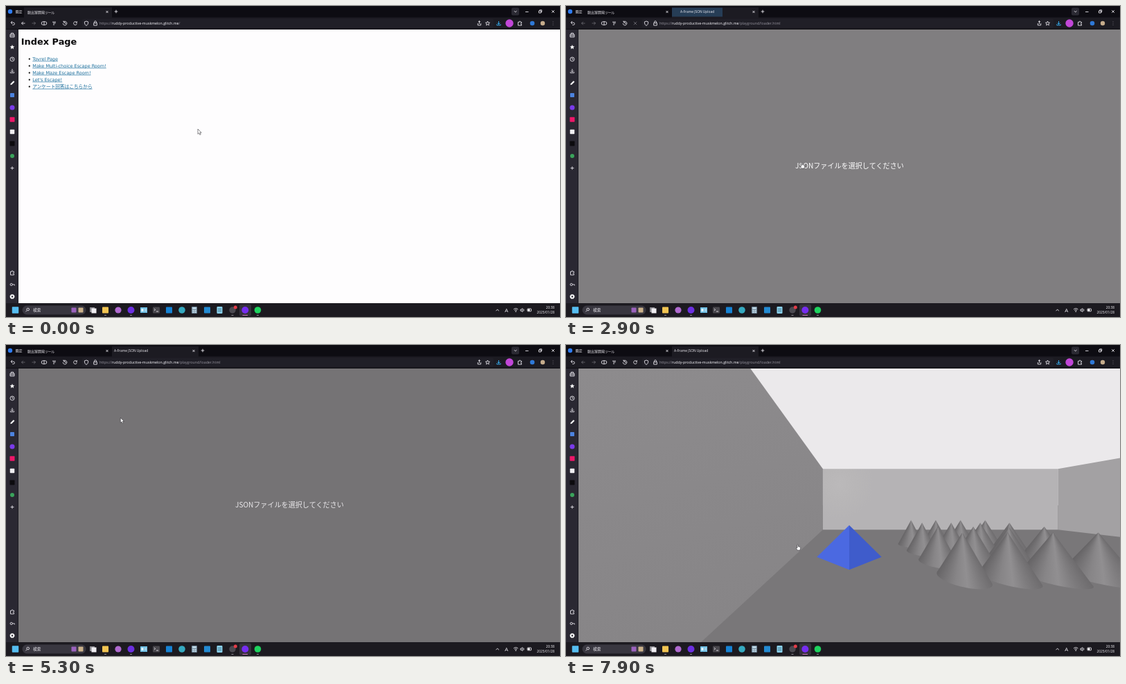
Write an HTML page with a canvas that moves like this. It is 800 by 450 pixels and loops after 8 s.

```html
<!DOCTYPE html>
<html lang="ja">
<head>
<meta charset="utf-8">
<style>
html, body { margin: 0; width: 100%; height: 100%; overflow: hidden; background: #1c1b22; }
canvas, svg { position: absolute; left: 0; top: 0; }
text { font-family: 'Open Sans', 'Noto Sans CJK JP', sans-serif; white-space: pre; }
.jp { font-family: 'Noto Sans CJK JP', sans-serif; font-feature-settings: 'palt'; }
.page { font-family: 'DejaVu Sans', 'Noto Sans CJK JP', sans-serif; }
.ln { fill: none; stroke: #e6e4ea; stroke-width: .9; }
</style>
</head>
<body>
<canvas id="scene" width="800" height="450"></canvas>
<svg id="stage" width="800" height="450" viewBox="0 0 800 450"></svg>
<script>
const LOOP = 8000, STEP = 100;
const OPEN_TAB = 700, LOADED = 2800, DIALOG_IN = 3500, DIALOG_OUT = 5100, SCENE = 5600;

const rect = (x, y, w, h, fill, extra = '') => `<rect x="${x}" y="${y}" width="${w}" height="${h}" fill="${fill}" ${extra}/>`;
const dot = (x, y, r, fill, extra = '') => `<circle cx="${x}" cy="${y}" r="${r}" fill="${fill}" ${extra}/>`;
const box = (x, y, s, fill) => rect(x - s / 2, y - s / 2, s, s, fill, 'rx=".8"');
const line = (d, extra = '') => `<path class="ln" d="${d}" ${extra}/>`;
const text = (x, y, s, size, fill = '#eeecf2', extra = '') =>
  `<text x="${x}" y="${y + size * .36}" font-size="${size}" fill="${fill}" ${extra}>${s}</text>`;
const jp = (x, y, s, size, fill, extra = '') => text(x, y, s, size, fill, 'class="jp" ' + extra);
const group = (id, body, extra = '') => `<g id="${id}" ${extra}>${body}</g>`;
const cross = (x, y, r, extra) => line(`M${x - r} ${y - r}l${2 * r} ${2 * r}m0 ${-2 * r}l${-2 * r} ${2 * r}`, extra);
const plus = (x, y, r) => line(`M${x - r} ${y}h${2 * r}M${x} ${y - r}v${2 * r}`);
const arrow = (x, y, dir, extra) => line(`M${x + 2.5 * dir} ${y}h${-5 * dir}m${2.3 * dir} -2.3l${-2.3 * dir} 2.3l${2.3 * dir} 2.3`, extra);
const chevron = (x, y, r, extra) => line(`M${x - r} ${y - r / 2}l${r} ${r}l${r} ${-r}`, extra);
const reload = (x, y) => line(`M${x + 2} ${y - 1.3}a2.4 2.4 0 1 0 .4 1.7M${x + 2.4} ${y - 2.7}v1.8h-1.8`);
const down = (x, y, c) => line(`M${x} ${y - 3}v4.4m-1.9 -1.8l1.9 1.9l1.9 -1.9M${x - 2.7} ${y + 1.4}v1.4h5.4v-1.4`, `style="stroke:${c}"`);
const star = (x, y, r, extra) => {
  const pts = [...Array(10)].map((_, i) => {
    const a = i * Math.PI / 5, k = i % 2 ? r * .45 : r;
    return (x + k * Math.sin(a)).toFixed(2) + ',' + (y - k * Math.cos(a)).toFixed(2);
  });
  return `<polygon points="${pts.join(' ')}" ${extra}/>`;
};
const puzzle = (x, y) => line(`M${x - 2.5} ${y - 1.7}h1.8c-.5 -1.7 2 -1.7 1.5 0h1.7v1.7c-1.6 -.4 -1.6 2 0 1.6v1.5h-5z`);
const lens = (x, y) => line(`M${x + 2.5} ${y - 1}a1.8 1.8 0 1 0 -3.6 0a1.8 1.8 0 1 0 3.6 0M${x - .6} ${y + .4}l-2 2`);

function titleBar() {
  return rect(0, 0, 800, 17, '#0d0c12') + rect(0, 16.5, 800, 17.5, '#1c1b22')
    + rect(0, 33.3, 800, .7, '#09090c')
    + dot(6, 8, 3.2, '#2f7cf0') + jp(13.5, 8, '既定', 5)
    + rect(26, 2, 127, 15, '#1c1b22', 'id="tab1"')
    + jp(31, 8.7, '脱出室開発ツール', 5) + cross(146, 8.5, 1.5)
    + group('plus1', plus(159, 8, 2.3))
    + group('tab2', rect(153, 2, 125, 15, '#1c1b22') + rect(153, 2.5, 0, 13, '#263d56', 'id="burst"')
      + dot(157, 9, .8, '#9f9da8', 'id="loader"')
      + text(165, 8.7, 'A-Frame JSON Upload', 4.85, '#f3f1f7', 'id="tabName"')
      + cross(271, 8.5, 1.5) + plus(284, 8, 2.3))
    + rect(730, 2.5, 11, 11, '#2b2a33', 'rx="2"') + chevron(735.7, 8, 1.8)
    + line('M750 8.5h4.5') + line('M769.5 7h3v3h-3zM770.7 7v-1.2h3v3h-1.2') + cross(790, 8, 1.8);
}

function toolBar() {
  const dim = 'opacity=".35"';
  return line('M7.5 24h3.2a1.7 1.7 0 0 1 0 3.4h-1.5M9 22l-2 2l2 2')
    + group('back', arrow(25, 25, 1)) + arrow(40, 25, -1, dim)
    + line('M53.5 22.7h3a2.3 2.3 0 0 1 0 4.6h-3a2.3 2.3 0 0 1 0 -4.6M55 22v6')
    + line('M67 23.2h5M68 25h3.5M68 27h2')
    + line('M82.3 25a2.8 2.8 0 1 0 .9 -2M83 21.5v1.9h1.9M85.2 23.3v2h1.5')
    + group('reload', reload(100, 25)) + group('stop', cross(100, 25, 2.2))
    + rect(110, 18.5, 594, 13, '#201f27', 'rx="2"')
    + line('M116 22l2.6 .9c.2 3 -.7 4.4 -2.6 5.5c-1.900 -1.100 -2.800 -2.500 -2.600 -5.500z')
    + line('M126.700 24.500h4.600v3.500h-4.600zM127.500 24.500v-1.200a1.500 1.500 0 0 1 3 0v1.200')
    + text(135, 25.2, '<tspan fill="#96949e">https://</tspan>ruddy-productive-muskmelon.glitch.me<tspan fill="#96949e" id="path">/</tspan>', 5.25, '#fbfaff')
    + line('M681.300 25v2.800h4.400v-2.800M683.500 26v-4.300m-1.600 1.500l1.600 -1.600l1.600 1.600')
    + star(695.5, 25.2, 3.2, 'class="ln"') + down(711.5, 25, '#39b9ff')
    + dot(727, 25, 5.7, '#c247d8') + puzzle(742, 25)
    + dot(760, 25, 3.3, '#2e78d7') + dot(775, 25, 3.2, '#c5ac8c')
    + [22.8, 25, 27.2].map(y => dot(790, y, .45, '#aaa8b0')).join('');
}

function sideBar() {
  return rect(0, 34, 18, 396, '#2a2832') + rect(17.4, 34, .6, 396, '#17161c')
    + line('M6 41h6v4h-6zM7.400 41v-1.800h3.200v1.800M6 43h6')
    + star(9, 59.5, 3.6, 'fill="#fff"')
    + dot(9, 77, 3, 'none', 'class="ln"') + line('M9 75v2.200h1.500')
    + down(9, 94, '#e6e4ea')
    + '<path d="M6.300 114.300l.6 -2l4 -4l1.500 1.500l-4 4z" fill="#fff"/>'
    + box(9, 129, 6, '#4c83df') + dot(9, 147, 3.5, '#7a3bea') + box(9, 164.2, 7, '#ee1769')
    + box(9, 182, 6.5, '#f0eef2') + box(9, 199, 7, '#0c0b0e') + dot(9, 217, 3, '#3aa35b')
    + plus(9, 234.5, 2.4) + puzzle(9, 386)
    + line('M9.300 403a1.600 1.600 0 1 0 -3.200 0a1.600 1.600 0 1 0 3.200 0h3v1.500')
    + dot(9, 420.5, 2.2, 'none', 'stroke="#fff" stroke-width="1.8"')
    + dot(9, 420.5, 3.1, 'none', 'stroke="#fff" stroke-dasharray="1.200 1.230"');
}

function taskBar() {
  const running = [143.5, 180.5, 327, 363.5];
  return rect(0, 430, 800, 20, '#1c1a20')
    + box(13.5, 440, 9.5, '#55bdf0')
    + rect(23.5, 433.5, 92, 13, '#393740', 'rx="6.500"') + lens(31, 440) + jp(39, 440, '検索', 5.7)
    + box(98, 440, 7, '#9b62bd') + box(108, 440, 7, '#cbb28b')
    + rect(121, 436, 7, 7, '#8b8a90') + rect(123.5, 437.5, 7, 7, '#f0eef2')
    + box(143.5, 440, 9, '#f2c452') + dot(162, 440, 4.6, '#b06ad0') + dot(180.5, 440, 5, '#6c2fe0')
    + rect(194, 436, 10, 8, '#6fc0e6') + rect(195.5, 438, 3, 4, '#e8f5fb') + line('M200 439h3M200 441h3')
    + rect(212, 435.5, 10, 9, '#49474d', 'rx="1"') + line('M214 438l1.700 1.500l-1.700 1.500M217 442h3')
    + box(235.5, 440, 9, '#1682d4') + dot(254, 440, 4.8, '#35a9c0')
    + rect(268, 435, 8, 10, '#72899b', 'rx="1"') + rect(269.3, 436.3, 5.4, 2, '#d5edfa')
    + [0, 1, 2, 3].map(i => rect(269.4 + i % 2 * 3, 439.7 + (i >> 1) * 2.4, 2.2, 1.600, '#d5edfa')).join('')
    + box(290.5, 440, 9, '#238ad2')
    + rect(304.5, 435, 8, 10, '#8bd2ec', 'rx="1"') + line('M306 438h5M306 440h5M306 442h5', 'style="stroke:#45788f"')
    + dot(327, 440, 4.7, '#4b4950') + dot(331.3, 436, 2.5, '#e33c48')
    + rect(337, 431.5, 17, 17, '#35323b', 'rx="2"') + dot(345.3, 440, 5, '#762df0') + dot(363.5, 440, 4.8, '#1ed35e')
    + running.map(x => rect(x - 1.5, 447, 3, .9, '#9a98a0')).join('') + rect(341.5, 447, 7.5, 1, '#d076c0')
    + line('M707.500 441.200l2.200 -2.200l2.200 2.200') + text(720.3, 440, 'A', 7.8)
    + line('M733 439a4.500 4.500 0 0 1 6.400 0M734.400 440.500a2.500 2.500 0 0 1 3.600 0') + dot(736.2, 442, .8, '#fff')
    + line('M743 439h1.300l1.500 -1.400v5l-1.500 -1.400h-1.300zM747.300 438.400q1.300 1.600 0 3.200')
    + rect(753, 438, 5.500, 3.800, 'none', 'class="ln" rx=".7"') + rect(753.5, 438.5, 3, 2.800, '#fff')
    + text(792, 436.7, '20:38', 4.8, '#f2f0f5', 'text-anchor="end"')
    + text(792, 443.2, '2025/01/28', 4.8, '#f2f0f5', 'text-anchor="end"');
}

function indexPage() {
  const links = ['Tovrel Page', 'Make Multi-choice Escape Room!', 'Make Maze Escape Room!', 'Let\'s Escape!', 'アンケート回答はこちらから'];
  return rect(18, 34, 782, 396, '#fefdfe')
    + text(21.8, 51.8, 'Index Page', 12.9, '#0b0a0c', 'class="page" font-weight="bold"')
    + links.map((s, i) => dot(33.8, 76.7 + i * 10, 1.15, '#111')
      + text(38.3, 76.3 + i * 10, s, i < 4 ? 6.47 : 6.67, '#1c6f9c', 'class="page" text-decoration="underline"')).join('');
}

const heads = [['今日', 67], ['昨日', 89], ['先週', 120], ['かなり前', 142]];
const files = [
  ['maze_registry_2025-01-28_11-30-03.json', '2025/01/28 20:30', 78],
  ['multiChoice_registry_2025-01-27_08-54-37.json', '2025/01/27 17:54', 100],
  ['multiChoice_registry_2025-01-27_08-32-14.json', '2025/01/27 17:32', 109],
  ['maze_registry_2025-01-21_11-38-06.json', '2025/01/21 20:38', 131],
  ['multiChoice_registry_2024-10-09_05-53-26.json', '2024/10/09 14:53', 153]];

function dialog() {
  const places = [['ホーム', 55.5, 23, '#e58b4d'], ['ギャラリー', 65.5, 23, '#3d9fe0'], ['デスクトップ', 85.5, 23, '#2fa7d6'],
    ['ダウンロード', 95.5, 23, '#2bb58a'], ['ドキュメント', 105, 23, '#9ab0c2'], ['Git', 115, 23, '#c8c6ca'], ['PC', 135, 23, '#3cabd9']];
  const grey = 'style="stroke:#8a888e;stroke-width:.6"';
  const button = (x, w, s, c) => rect(x, 204.500, w, 9, '#333135', `rx="1.500" stroke="${c}" stroke-width=".8"`)
    + jp(x + w / 2, 209, s, 4.800, '#fff', 'text-anchor="middle"');
  return rect(2, -2, 395, 224, '#1b191e', 'rx="2" style="filter:drop-shadow(0 8px 12px #000b)"')
    + '<g clip-path="url(#dlg)">'
    + rect(2, 0, 395, 13, '#1f1d22') + dot(10, 6.5, 3.8, '#762df0') + jp(16, 6.5, 'ファイルのアップロード', 4.800) + cross(390.500, 6.5, 1.800)
    + arrow(12.500, 24, 1) + arrow(32, 24, -1, 'opacity=".5"') + chevron(42, 24, 1.300, grey)
    + line('M51.500 27v-5.500m-2.200 2.200l2.200 -2.200l2.200 2.200')
    + rect(61, 16.500, 242, 15, 'none', 'stroke="#39373c" stroke-width=".8"') + down(68, 24, '#27c08b')
    + line('M74 22.800l1.200 1.200l-1.200 1.200') + jp(79, 24, 'ダウンロード', 4.900) + chevron(279, 24, 1.400) + reload(294.500, 24)
    + rect(307.500, 16.500, 83, 15, 'none', 'stroke="#39373c" stroke-width=".8"')
    + jp(311, 24, 'ダウンロードの検索', 4.700, '#8d8b91') + lens(386, 24)
    + rect(2, 34, 395, .6, '#2d2b30')
    + jp(10.500, 42, '整理', 5) + '<path d="M23 41.200h3.600l-1.800 2z" fill="#ddd"/>' + jp(39, 42, '新しいフォルダー', 4.800)
    + rect(346, 39, 6, 6, '#a5a3a9') + line('M346 42h6M349 39v6', 'style="stroke:#333;stroke-width:.5"')
    + '<path d="M356.500 41.200h3.600l-1.800 2z" fill="#ddd"/>'
    + rect(369, 39, 6.500, 6.500, '#e8e6ec') + rect(372.5, 39, 3, 6.500, '#3a9fd8') + dot(387, 42, 3.400, '#1d80c8')
    + text(386, 42, '?', 4.500)
    + rect(2, 48, 395, 140, '#19171b') + rect(5, 50.5, 63, 10, '#323035', 'rx="1"') + rect(69.500, 48, .5, 140, '#2d2b30')
    + places.map(([s, y, x, c], i) => box(17.300, y, 5.500, c) + jp(x, y, s, 4.800, '#eceaf0')
      + (i > 1 && i < 6 ? line(`M62.800 ${y + 2}l2 -2m-1.500 -1.500l3 3l1 -3.500z`, grey) : '')).join('')
    + line('M8 75.500h57M8 125h57', 'style="stroke:#333136;stroke-width:.6"')
    + line('M13 54.800l1.300 1.200l-1.300 1.200M8 134l1.200 1.200l-1.200 1.200', grey)
    + rect(70, 0, 327, 9, '#4a484c', 'id="hover"')
    + jp(77, 54, '名前', 4.900) + jp(302, 54, '更新日時', 4.900) + jp(362.500, 54, '種類', 4.900)
    + rect(299.500, 49, .6, 10, '#4a484d') + rect(359.500, 49, .6, 10, '#4a484d') + chevron(329, 50, 1, grey)
    + heads.map(([s, y]) => chevron(74.500, y, 1.800, grey) + jp(79, y, s, 5.600)).join('')
    + files.map(([s, d, y]) => rect(78.500, y - 3, 4.600, 6, '#e9e7eb') + line(`M79.500 ${y - .7}h2.600m-2.600 1.600h2.600`, grey)
      + text(86, y, s, 4.300) + text(302, y, d, 4.550) + jp(362.500, y, 'JSON ソース ファイル', 4.500)).join('')
    + rect(77, 183.800, 271, .9, '#9a989d')
    + rect(2, 188, 395, 35, '#2b292d') + jp(85, 196.500, 'ファイル名(N):', 4.800, '#fff', 'text-anchor="end"')
    + rect(87.500, 192, 218.500, 9.500, '#343236', 'stroke="#d0ced3" stroke-width=".8"') + line('M89.500 194v5.500', grey)
    + text(90, 196.700, files[0][0], 4.400, '#fff', 'id="picked"')
    + chevron(302, 196.700, 1.300) + rect(311.500, 192, 78, 9.500, '#343236', 'stroke="#77757a" stroke-width=".7"')
    + text(313.500, 196.700, '*.json', 4.800) + chevron(385.500, 196.700, 1.300)
    + button(311.500, 36, '開く(O)', '#e8e6ea') + button(353, 36, 'キャンセル', '#77757a')
    + line('M392 220.500l3 -3', grey) + '</g>';
}

const shape = d => `<path d="${d}" fill="#fff" stroke="#2a282d" stroke-width=".55" stroke-linejoin="round"/>`;
const stage = document.getElementById('stage');
stage.innerHTML = '<defs><clipPath id="dlg"><rect x="2" y="0" width="395" height="222"/></clipPath></defs>'
  + group('index', indexPage())
  + rect(18, 34, 782, 396, '#2a2832', 'id="blank"')
  + group('prompt', rect(18, 34, 782, 396, '#807e80', 'id="shade"')
    + text(331, 231, 'JSONファイルを選択してください', 10.1, '#fff', 'class="page" style="font-family:\'Noto Sans CJK JP\',sans-serif" id="ask"'))
  + group('status', rect(18, 421, 110.500, 9.500, '#2a2832', 'stroke="#55525e" stroke-width=".6"')
    + text(20, 426, 'ruddy-productive-muskmelon.glitch.me', 4.530))
  + titleBar() + toolBar() + sideBar() + taskBar()
  + group('dialog', dialog())
  + group('cursor', group('arrow', shape('M0 0v7.300l1.700 -1.500l1.200 2.600l1.300 -.6l-1.200 -2.500h2.200z'))
    + group('hand', shape('M-1 0q.7 -.9 1.300 0v2.600l2.700 .7q1 .4 .7 1.700l-.7 3h-3.700l-2.100 -3q-.2 -1.200 1.800 -.2z'))
    + group('fist', shape('M-1.800 2q.8 -1.400 1.500 -.4q.8 -.8 1.400 .1q1.100 -.4 1.300 .9v1.800l-.7 1.600h-2.700l-1.300 -2z')));

const el = {};
stage.querySelectorAll('[id]').forEach(n => el[n.id] = n);
const show = (id, on) => el[id].setAttribute('visibility', on ? 'inherit' : 'hidden');
const set = (id, attrs) => { for (const k in attrs) el[id].setAttribute(k, attrs[k]); };

// Keyed values: [time, ...values]
function at(keys, t, ease) {
  const i = keys.findIndex(k => k[0] > t);
  if (i < 1) return (i ? keys[keys.length - 1] : keys[0]).slice(1);
  const a = keys[i - 1], b = keys[i], u = ease((t - a[0]) / (b[0] - a[0]));
  return a.slice(1).map((v, j) => v + (b[j + 1] - v) * u);
}
const smooth = u => u * u * (3 - 2 * u), linear = u => u;
const mouse = [[0, 277, 178], [500, 62, 106], [700, 62, 106], [1600, 317, 213], [1900, 317, 213], [2700, 341, 227],
  [3400, 341, 227], [4400, 180, 87], [4800, 132, 78], [5100, 132, 78], [5800, 300, 215], [6100, 300, 215],
  [7100, 299, 212], [7300, 299, 212], [7900, 335, 289]];
const wallDistance = [[6100, 1.73], [6300, 2.5], [7100, 7.43], [7900, 10.73]];

const ctx = document.getElementById('scene').getContext('2d');
const FOCAL = 236, LEFT = -1.73, RIGHT = 13.7, TOP = 2.4, FLOOR = -1.6, NEAR = .1;
const project = ([x, y, z]) => { const s = FOCAL / Math.max(z, NEAR); return [409 + x * s, 232 - y * s]; };

function fill(points, style) {
  ctx.beginPath();
  points.forEach(p => ctx.lineTo(...p));
  ctx.fillStyle = style;
  ctx.fill();
}

function cone(x, z) {
  if (z < .6) return;
  const tip = project([x, -.6, z]);
  const base = [...Array(48)].map((_, i) => {
    const a = i * Math.PI / 24;
    return project([x + .5 * Math.cos(a), FLOOR, z + .5 * Math.sin(a)]);
  });
  const angle = p => Math.atan2(p[1] - tip[1], p[0] - tip[0]);
  const sorted = [...base].sort((p, q) => angle(p) - angle(q));
  const right = sorted[0], left = sorted[47], from = angle(right) - .04, span = angle(left) + .04 - from;
  const shade = ctx.createConicGradient(from, ...tip);
  ['#6b696b', '#7d7b7d', '#918f91', '#878587', '#757375', '#636163'].forEach((c, i) => shade.addColorStop(i / 5 * span / (2 * Math.PI), c));
  fill([tip, right, left], shade);
  fill(base, shade);
}

function drawScene(z) {
  const quad = (...p) => p.map(project);
  fill([[18, 34], [800, 34], [800, 232], [18, 232]], '#ebe9eb');
  fill([[18, 232], [800, 232], [800, 430], [18, 430]], '#797779');
  const side = (x, c) => fill(quad([x, TOP, z], [x, TOP, NEAR], [x, FLOOR, NEAR], [x, FLOOR, z]), c);
  const sideShade = ctx.createLinearGradient(18, 34, 120, 430);
  sideShade.addColorStop(0, '#8d8b8d');
  sideShade.addColorStop(1, '#878587');
  side(LEFT, sideShade);
  side(RIGHT, '#a3a1a3');
  const [gx, gy] = project([-.65, 1.4, z]), glow = ctx.createRadialGradient(gx, gy, 0, gx, gy, FOCAL / z * 2.3);
  const bright = Math.min(1, 2 / z);
  glow.addColorStop(0, `rgb(${183 + 22 * bright},${181 + 22 * bright},${182 + 21 * bright})`);
  glow.addColorStop(.45, `rgb(${182 + 9 * bright},${180 + 9 * bright},${182 + 8 * bright})`);
  glow.addColorStop(1, '#b5b3b5');
  fill(quad([LEFT, TOP, z], [RIGHT, TOP, z], [RIGHT, FLOOR, z], [LEFT, FLOOR, z]), glow);
  for (let row = 0; row < 4; row++)
    for (let col = 3; col >= 0; col--) cone(2.5 + col, z - 4.12 - row);
  const pz = z - 5.68;
  if (pz > .3) {
    const face = (x, c) => fill(quad([0, -.615, pz], [x, FLOOR, pz], [0, FLOOR, pz - 1]), c);
    face(-1, '#4b69e1');
    face(1, '#3f5ccb');
  }
}

function render(t) {
  const tabOpen = t >= OPEN_TAB, loading = tabOpen && t < LOADED, inScene = t >= SCENE;
  const [mx, my] = at(mouse, t, smooth);
  show('index', !tabOpen);
  show('blank', loading);
  show('prompt', t >= LOADED && !inScene);
  set('shade', { fill: t < DIALOG_IN ? '#807e80' : '#757375' });
  set('ask', { fill: t < DIALOG_IN ? '#fff' : '#ebe9ec' });
  show('status', loading && t >= 1000);

  show('tab1', !tabOpen);
  show('plus1', !tabOpen);
  show('tab2', tabOpen);
  show('loader', loading);
  set('loader', { cx: 159 - 2 * Math.cos((t - 1900) / 1000 * 2 * Math.PI) });
  const burst = (t - LOADED + 100) / 200;
  set('burst', { width: burst > 0 && burst < 3 ? Math.min(125, 73 * burst) : 0, opacity: Math.min(1, Math.max(0, 3 - burst)) });
  set('tabName', { x: t < LOADED + 500 ? 165 : 156 });
  const stopping = tabOpen && t < LOADED + 400;
  show('reload', !stopping);
  show('stop', stopping);
  set('stop', { opacity: loading ? 1 : .4 });
  set('back', { opacity: tabOpen ? .35 : 1 });
  el.path.textContent = tabOpen ? '/playground/loader.html' : '/';

  const dialogOn = t >= DIALOG_IN && t < DIALOG_OUT;
  show('dialog', dialogOn);
  set('dialog', { opacity: t === DIALOG_IN ? .6 : 1 });
  const row = [...heads.map(h => [h[1], 11.500]), ...files.map(f => [f[2], 9])].find(([y, h]) => Math.abs(my + 1 - y) <= h / 2);
  const hovering = dialogOn && row && mx > 70 && mx < 397;
  show('hover', hovering);
  if (hovering) set('hover', { y: row[0] - row[1] / 2, height: row[1] });
  show('picked', dialogOn && t >= 4900);

  const fist = t >= 6600 && t < 7300;
  const hand = !fist && (inScene || (t >= 500 && t < OPEN_TAB) || (t >= LOADED && t < DIALOG_IN));
  show('fist', fist);
  show('hand', hand);
  show('arrow', !fist && !hand);
  set('cursor', { transform: `translate(${mx} ${my})` });

  ctx.clearRect(0, 0, 800, 450);
  if (inScene) drawScene(at(wallDistance, t, linear)[0]);
}

const start = performance.now();
function tick() {
  render(Math.floor((performance.now() - start) % LOOP / STEP) * STEP);
  requestAnimationFrame(tick);
}
tick();
</script>
</body>
</html>
```
